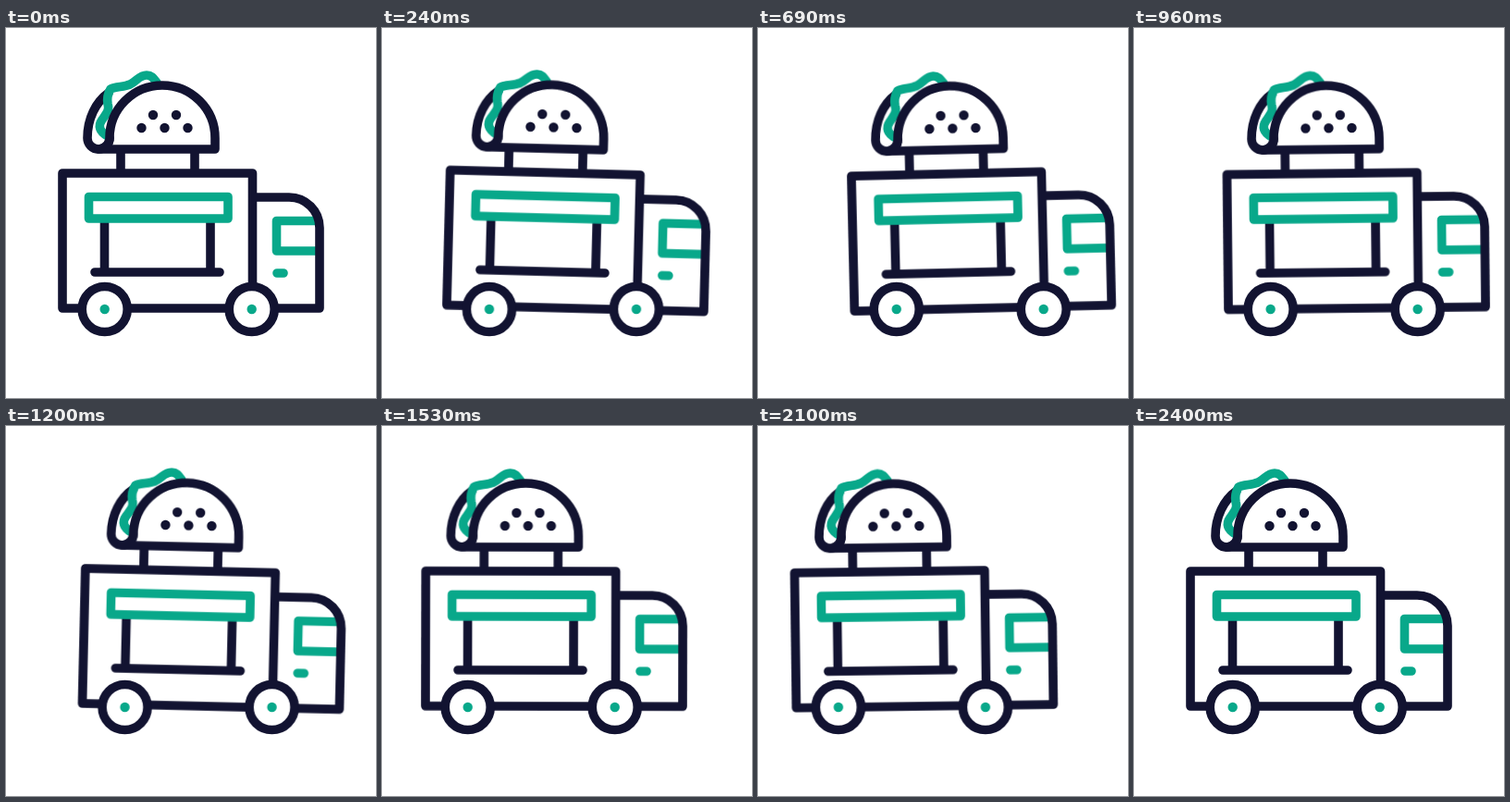
Animation, 400 px wide and 400 px high, one loop 5.43 s. Source, as an HTML page without scripts:

```html
<!DOCTYPE html>
<html lang="en">
<head>
<meta charset="utf-8">
<title>Taco truck</title>
<style>
  html, body { margin: 0; width: 100%; height: 100%; overflow: hidden; background: #fff; }
  svg { display: block; width: 100%; height: 100%; fill: none; stroke-width: 9.6; stroke-linecap: round; stroke-linejoin: round; }
  .ink { stroke: #121331; }
  .mint { stroke: #08a88a; }
  .dots { stroke: #121331; stroke-width: 10.4; }
  .hub { fill: #08a88a; stroke: none; }
  .tire { fill: #fff; stroke: #121331; }
  .drive, .rock { animation: drive 5430ms cubic-bezier(.37, 0, .63, 1) infinite; }
  .rock { animation-name: rock; transform-origin: 195px 290px; }
  @keyframes drive {
    0%, 44.2%, 100% { transform: translateX(0); }
    14.73% { transform: translateX(45px); }
    34.62% { transform: translateX(-32px); }
  }
  @keyframes rock {
    0%, 44.2%, 100% { transform: rotate(0deg); }
    4.73%, 23.7% { transform: rotate(1.5deg); }
    14.22%, 33.19% { transform: rotate(-1.5deg); }
  }
</style>
</head>
<body>
<svg viewBox="0 0 400 400">
  <defs>
    <g id="wheel">
      <circle class="tire" r="24.5"/>
      <circle class="hub" r="5.2"/>
    </g>
  </defs>
  <g class="drive">
    <g class="rock">
      <!-- taco -->
      <path class="ink" d="M112 119A12 12 0 0 1 88 119C88 98 97 80 111 70"/>
      <path class="mint" d="M110 117C101 112 99 106 104 99C109 92 112 89 110 82C109 76 110 71 113 66C119 63 127 64 134 61C142 57 144 51 152 51C158 51 160 55 163 59"/>
      <path class="ink" d="M100 131H226V119A57 57 0 0 0 112 119A12 12 0 0 1 100 131"/>
      <path class="dots" d="M159 94h0M184 94h0M146.5 108h0M171.5 108h0M196.5 108h0"/>
      <!-- body -->
      <path class="ink" d="M124 134V154M204 134V154M106.5 209V264M221 209V264M96 264H231"/>
      <path class="mint" d="M89.5 182.5H240V206H89.5ZM337 208.5H292.5V241H337M293 265H300"/>
      <path class="ink" d="M61 303V157H266.5V290M266.5 183H306A33 33 0 0 1 339 216V303H61"/>
    </g>
    <use href="#wheel" x="106.7" y="304"/>
    <use href="#wheel" x="265.7" y="304"/>
  </g>
</svg>
</body>
</html>
```
